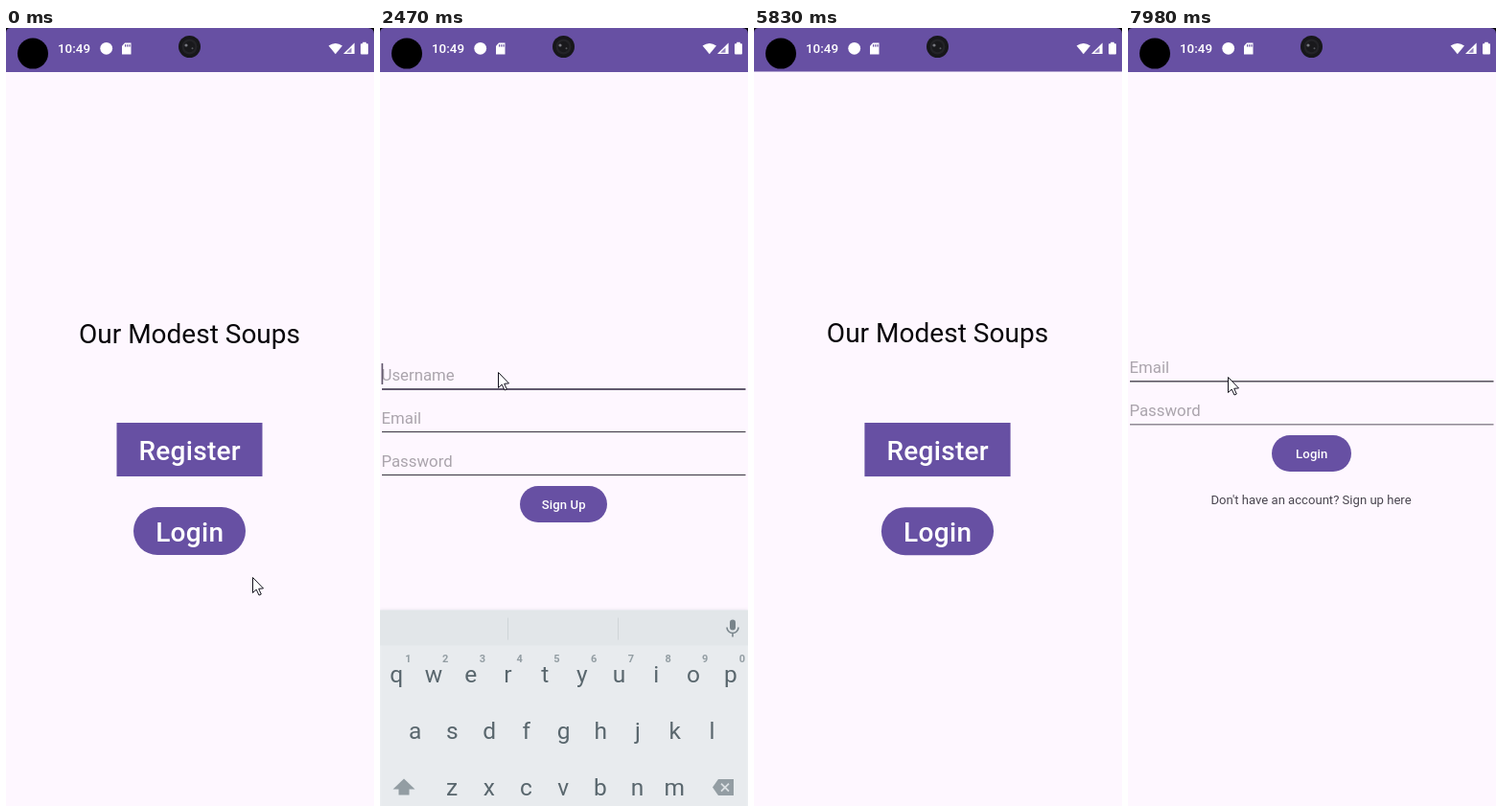
Animation of 384x812 px, one loop 8000 ms. Source, as an HTML page with a canvas:

```html
<!DOCTYPE html>
<html lang="en">
<head>
<meta charset="utf-8">
<title>Meal app demo</title>
<style>
html, body { margin: 0; width: 100%; height: 100%; overflow: hidden; background: #fef7ff; }
canvas { display: block; width: 384px; height: 812px; }
</style>
</head>
<body>
<canvas id="stage" width="384" height="812"></canvas>
<script>
const W = 384, H = 812, MID = 191.5, LOOP = 8000;
const PURPLE = '#6750a3', PAPER = '#fef7ff', INK = '#49454f', HINT = '#aaa4ac';
const KEY = '#37474f', KEY_GREY = '#7f8b91', KEY_BG = '#ebeff1';
const ctx = document.getElementById('stage').getContext('2d');

const clamp = v => Math.max(0, Math.min(1, v));
const mix = (a, b, k) => a + (b - a) * k;
const part = (t, from, to) => clamp((t - from) / (to - from));
const easeOut = u => 1 - (1 - u) ** 5;
const easeBoth = u => u * u * (3 - 2 * u);

// Drawing helpers

function rect(x, y, w, h, color, r = 0) {
  ctx.fillStyle = color;
  if (!r) return ctx.fillRect(x, y, w, h);
  ctx.beginPath();
  ctx.roundRect(x, y, w, h, r);
  ctx.fill();
}

function disc(x, y, r, color) {
  ctx.fillStyle = color;
  ctx.beginPath();
  ctx.arc(x, y, r, 0, Math.PI * 2);
  ctx.fill();
}

function fill(path, color) {
  ctx.fillStyle = color;
  ctx.fill(new Path2D(path));
}

function stroke(path, color, width) {
  ctx.strokeStyle = color;
  ctx.lineWidth = width;
  ctx.stroke(new Path2D(path));
}

function text(str, x, y, size, color, align = 'left', weight = 400) {
  ctx.font = `${weight} ${size}px Roboto, sans-serif`;
  ctx.textAlign = align;
  ctx.fillStyle = color;
  ctx.fillText(str, x, y);
}

function button(label, y, w, h, r, size) {
  rect(MID - w / 2, y, w, h, PURPLE, r);
  ctx.letterSpacing = size * 0.01 + 'px';
  text(label, MID + 0.2, y + h / 2 + size * 0.385, size, '#fff', 'center', 500);
  ctx.letterSpacing = '0px';
}

function field(label, lineY, thick = 1.2, color = INK) {
  text(label, 1.5, lineY - 8.7, 16.8, HINT);
  rect(2, lineY - thick / 2, 379.5, thick, color);
}

// Pages

function blank() {
  rect(0, 0, W, H, PAPER);
  rect(0, 0, W, 46, PURPLE);
}

function home() {
  blank();
  text('Our Modest Soups', MID, 328.5, 28, '#08060a', 'center');
  button('Register', 412, 152, 56, 0, 28);
  button('Login', 500, 117, 50, 25, 28);
}

function signUp() {
  blank();
  field('Username', 377, 1.9, '#5a5066');
  field('Email', 421.5);
  field('Password', 466.5);
  button('Sign Up', 478, 91, 38, 19, 13.1);
}

function login() {
  blank();
  field('Email', 368.8, 1.4);
  field('Password', 413.8, 1.4, '#88828c');
  button('Login', 425, 83, 38, 19, 13.1);
  text("Don't have an account? Sign up here", 191, 496.5, 13.1, INK, 'center');
}

function show(page, scale, alpha) {
  ctx.save();
  ctx.globalAlpha = alpha;
  ctx.translate(W / 2, H / 2);
  ctx.scale(scale, scale);
  ctx.translate(-W / 2, -H / 2);
  page();
  ctx.restore();
}

function openPage(from, to, dt) {
  const p = easeOut(clamp(dt / 400));
  show(from, mix(1, 1.05, p), 1);
  show(to, mix(0.85, 1, p), part(dt, 50, 133));
}

function closePage(from, to, dt) {
  const p = easeOut(clamp(dt / 400));
  show(to, mix(1.1, 1, p), 1);
  show(from, mix(1, 0.9, p), 1 - part(dt, 33, 116));
}

function pages(t) {
  if (t < 1370) home();
  else if (t < 5690) openPage(home, signUp, t - 1370);
  else if (t < 6740) closePage(signUp, home, t - 5600);
  else openPage(home, login, t - 6740);
}

function caret(t) {
  const focused = t >= 2400 && t < 5690;
  if (focused && (t - 2180) % 1000 < 500) rect(1.5, 350, 1.7, 22, '#655a70');
}

// Keyboard

function keyRow(keys, x, base, size = 24.5, color = KEY, weight = 400) {
  [...keys].forEach((k, i) => text(k, x + i * 38.72, base, size, color, 'center', weight));
}

function keyboard() {
  ctx.save();
  ctx.shadowColor = 'rgba(60,60,80,.2)';
  ctx.shadowBlur = 4;
  rect(0, 535, W, 300, KEY_BG);
  ctx.restore();
  rect(0, 535, W, 37, '#e1e6e8');
  for (const x of [133, 248]) rect(x, 543, 1, 23, '#cbd1d4');

  rect(365, 545, 6, 11, '#5f6d74', 3);
  stroke('M362 553a6 6 0 0 0 12 0M368 559v4', '#5f6d74', 1.6);

  keyRow('1234567890', 29.5, 589.5, 11, KEY_GREY, 700);
  keyRow('qwertyuiop', 17.3, 610);
  keyRow('asdfghjkl', 36.7, 669);
  keyRow('zxcvbnm', 75, 728);

  fill('M25 711l11.5 11h-6v6h-11v-6h-6z', KEY_GREY);
  rect(17, 739.5, 16, 1.6, KEY_GREY);
  fill('M347 720l6-8.5h16v17h-16z', KEY_GREY);
  stroke('M356 716l8 8m0-8l-8 8', KEY_BG, 1.8);

  text('?123', 10.5, 785, 15.3, '#56656c');
  text(',', 75.5, 787, 24.5, KEY, 'center');
  text('.', 307.5, 787, 24.5, KEY, 'center');
  rect(98, 768, 187, 22, '#cfd4d7', 3);
  disc(355.5, 779, 17, '#4db6ac');
  stroke('M363.5 774v6h-15m4.5-4.5l-4.5 4.5l4.5 4.5', '#fff', 1.8);
}

function keyboardAt(t) {
  if (t < 2400 || t > 5080) return;
  const out = part(t, 4930, 5080);
  const away = (1 - part(t, 2360, 2750)) ** 4 + out * out;
  ctx.save();
  ctx.globalAlpha = part(t, 2360, 2497) * (1 - out);
  ctx.translate(0, 277 * away);
  keyboard();
  ctx.restore();
}

// Status bar and screen cut-outs

function statusBar() {
  fill('M0 0h5q-5 0-5 5zM384 0h-6q6 0 6 6z', '#000');
  disc(28, 26.6, 16, '#000');
  text('10:49', 54, 26, 13.4, '#fff', 'left', 500);
  disc(104.7, 21.3, 6.4, '#fff');
  fill('M124 15.5h6.5v12h-9.5v-8.7z', '#fff');
  for (let i = 0; i < 3; i++) rect(124 + i * 2.2, 17.2, 1.2, 2.4, PURPLE);

  fill('M343.8 27.3l-7.2-8.7q7.2-5.4 14.4 0z', '#fff');
  fill('M363.6 15.5v11.5h-11.6z', '#fff');
  fill('M360.5 20.5v5.3h-5.3z', '#8f7dbd');
  rect(370, 16.2, 8, 11.3, '#fff', 1);
  rect(372.2, 14.8, 3.6, 2, '#fff');

  disc(MID, 19.5, 11.5, '#17171a');
  disc(MID, 19.5, 8, '#232327');
  disc(MID, 19.5, 5.8, '#19191c');
  disc(188, 18, 1.6, '#77787f');
  disc(194.5, 21.3, 1, '#55565c');
}

// Pointer moves: start, end, x, y
const moves = [
  [70, 820, 184, 431], [820, 1170, 166, 361], [1720, 2130, 123, 359],
  [3050, 3350, 233, 486], [3350, 3700, 135, 249], [3940, 4200, 179, 432],
  [5000, 5500, 136, 576], [6100, 6590, 166, 532], [7490, 7980, 104, 364]
];

function pointer(t) {
  if (t > 4220 && t < 6100) return;
  let x = 257, y = 573;
  for (const [from, to, toX, toY] of moves) {
    const k = easeBoth(part(t, from, to));
    x = mix(x, toX, k);
    y = mix(y, toY, k);
  }
  ctx.save();
  ctx.translate(Math.round(x) + 0.5, Math.round(y) + 0.5);
  const arrow = 'M0 0v16l3.7-3.4l2.8 5.9l2.3-1l-2.6-5.7l4.8-.4z';
  fill(arrow, '#fff');
  stroke(arrow, '#15131f', 1);
  ctx.restore();
}

function draw(t) {
  pages(t);
  caret(t);
  keyboardAt(t);
  statusBar();
  pointer(t);
}

const start = performance.now();
function tick() {
  draw((performance.now() - start) % LOOP);
  requestAnimationFrame(tick);
}
tick();
</script>
</body>
</html>
```
